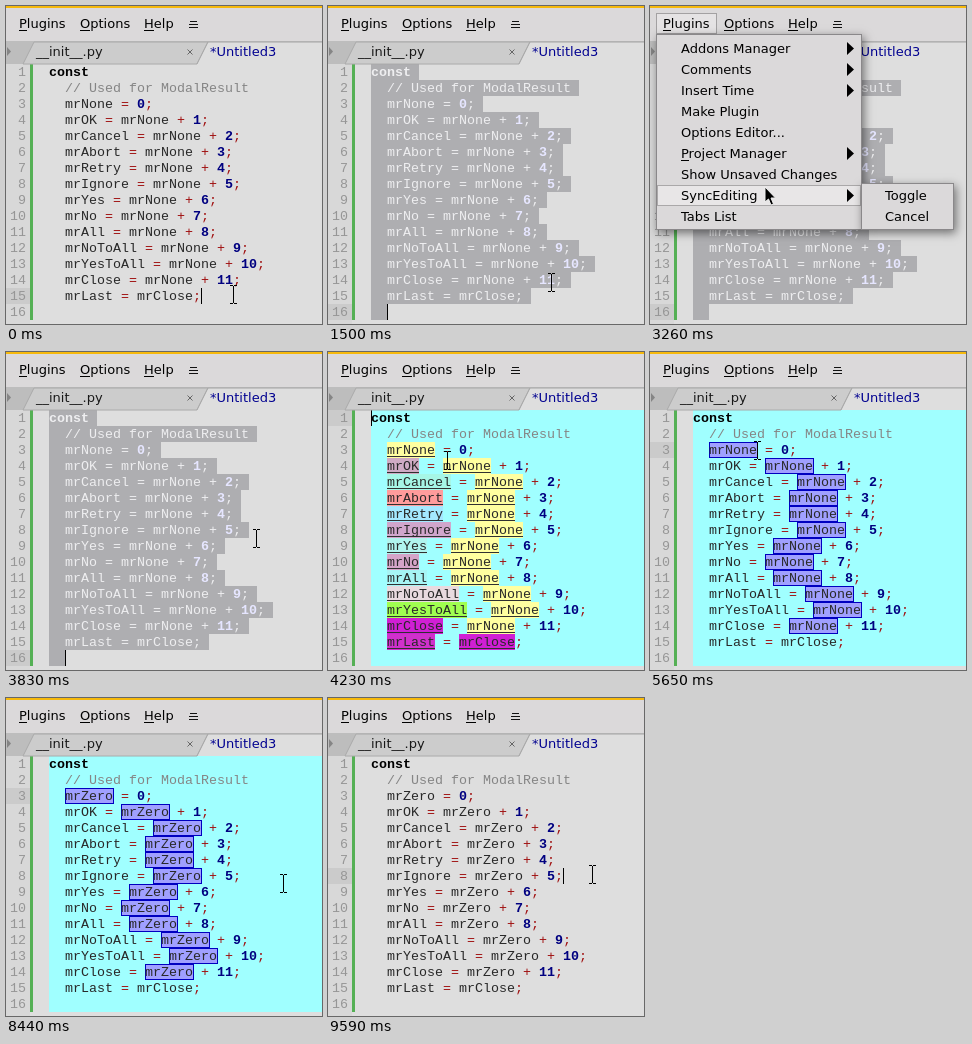
An HTML page with a canvas that plays this animation: 316 px wide and 318 px high, repeating every 9610 ms.

```html
<!DOCTYPE html>
<html>
<head>
<meta charset="utf-8">
<title>Synchronised editing</title>
<style>
html, body { margin: 0; width: 100%; height: 100%; overflow: hidden; background: #dedede; }
canvas { display: block; }
</style>
</head>
<body>
<canvas id="stage" width="316" height="318"></canvas>
<script>
const g = document.getElementById('stage').getContext('2d');
const LOOP = 9610, LEFT = 43, TOP = 58, CW = 8, LH = 16;
const UI = '13px "DejaVu Sans", sans-serif';
const MONO = '13.333px "Liberation Mono", monospace';
const PAPER = '#dedede', PANEL = '#dbd9da', CYAN = '#a0ffff';

const names = ['None', 'OK', 'Cancel', 'Abort', 'Retry', 'Ignore', 'Yes', 'No',
  'All', 'NoToAll', 'YesToAll', 'Close', 'Last'];
const tints = ['#ffffa0', '#cfabc4', '#a6f6e6', '#ff9c9c', '#a4e8ff', '#d0a6cc', '#b0f4ee',
  '#d4a4c8', '#a6f4f4', '#e8dadf', '#a0ff50', '#d01fd4', '#d030cc'];

const menu = ['Addons Manager', 'Comments', 'Insert Time', 'Make Plugin', 'Options Editor...',
  'Project Manager', 'Show Unsaved Changes', 'SyncEditing', 'Tabs List'];
const nested = [0, 1, 2, 5, 7];

// Pointer path: time, x, y
const path = [
  [0, 227, 288], [1460, 227, 288], [1740, 150, 75], [1910, 150, 75], [2140, 42, 12],
  [2340, 42, 12], [2920, 113, 181], [3240, 113, 181], [3580, 250, 186], [3850, 250, 186],
  [4230, 119, 108], [4500, 106, 94], [4900, 106, 94], [5060, 107, 98], [7950, 107, 98],
  [8270, 277, 184], [8400, 277, 184], [8440, 277, 185], [9510, 276, 185], [9590, 264, 176],
  [LOOP, 264, 176]
];

// Edited word: time, text
const edits = [[0, 'mrNone'], [5690, 'mrNon'], [5840, 'mrNo'], [5990, 'mrN'], [6120, 'mr'],
  [6740, 'mrZ'], [7050, 'mrZe'], [7230, 'mrZer'], [7650, 'mrZero']];

// Caret: time, line, column (no line = hidden)
const carets = [[0, 14, 19], [220], [820, 14, 19], [1130, 15, 2], [1700], [2270, 15, 2],
  [2880], [3480, 15, 2], [3870, 0, 0], [4480], [8680, 7, 24], [8800], [9400, 7, 24]];

const current = (list, t) => list.filter(k => k[0] <= t).pop();

function box(x, y, w, h, fill, line) {
  g.fillStyle = fill;
  g.fillRect(x, y, w, h);
  if (line) {
    g.strokeStyle = line;
    g.lineWidth = 1;
    g.strokeRect(x + .5, y + .5, w - 1, h - 1);
  }
}

function poly(points, fill, line) {
  g.beginPath();
  points.forEach(p => g.lineTo(p[0], p[1]));
  if (fill) { g.closePath(); g.fillStyle = fill; g.fill(); }
  if (line) { g.strokeStyle = line; g.lineWidth = 1; g.stroke(); }
}

function text(s, x, y, color, font = UI) {
  g.font = font;
  g.fillStyle = color;
  g.fillText(s, x, y);
}

function pointerAt(t) {
  const i = path.findIndex(k => k[0] > t);
  const [t0, x0, y0] = path[i - 1], [t1, x1, y1] = path[i];
  const p = (t - t0) / (t1 - t0), e = p * p * (3 - 2 * p);
  return [Math.round(x0 + (x1 - x0) * e), Math.round(y0 + (y1 - y0) * e)];
}

function codeLines(word) {
  const rows = names.map((n, i) => `  mr${n} = ` +
    (i === 12 ? 'mrClose;' : i ? `${word} + ${i};` : '0;'));
  rows[0] = `  ${word} = 0;`;
  return ['const', '  // Used for ModalResult', ...rows, '  '];
}

function tokenColor(s, selected) {
  if (selected) return /^\d/.test(s) ? '#e6e6ff' : '#eeeef0';
  if (s.startsWith('//')) return '#858585';
  if (/^\d/.test(s)) return '#000080';
  return /^[=+;]/.test(s) ? '#a01010' : s === 'const' ? '#000' : '#282828';
}

function drawCode(t) {
  const selected = t >= 1130 && t < 3870;
  const sync = t >= 3870 && t < 8680;
  const editing = sync && t >= 5160;
  const word = current(edits, t)[1];
  const active = t < 1130 ? 14 : t < 3870 ? 15 : t < 5160 ? 0 : t < 8680 ? 2 : 7;

  box(0, TOP, 316, 260, PAPER);
  box(0, TOP, 24, 260, '#d8d8d8');
  box(0, TOP + active * LH, 24, LH, '#cbcbcb');
  box(24, TOP, 3, 256, '#55b055');
  if (sync) box(LEFT, TOP, 316 - LEFT, 256, CYAN);

  codeLines(word).forEach((line, row) => {
    const y = TOP + row * LH, num = String(row + 1);
    text(num, 20 - num.length * CW, y + 12, '#969696', MONO);
    if (selected) box(LEFT, y, (line.length + (row < 15)) * CW, LH, '#aeaeb1');
    for (const m of line.matchAll(/\/\/.*|\w+|[=+;]/g)) {
      const s = m[0], x = LEFT + m.index * CW, w = s.length * CW;
      if (sync && s.startsWith('mr')) {
        if (!editing) {
          box(x, y, w, LH, tints[names.indexOf(s.slice(2))]);
          box(x, y + 14, w, 1, '#303030');
        } else if (s === word && (row === 2 || m.index > 2)) {
          box(x, y, w + 1, LH, '#a0a0ff', '#0000c0');
        }
      }
      const bold = /^(\d|const)/.test(s) ? 'bold ' : '';
      text(s, x, y + 12, tokenColor(s, selected), bold + MONO);
    }
  });

  const [, row, col] = current(carets, t);
  if (row !== undefined) box(LEFT + col * CW, TOP + row * LH, 1, LH, '#000');
}

function drawBars(hover) {
  box(0, 0, 316, 36, PANEL);
  box(0, 0, 316, 2, '#f6b90c');
  if (hover) box(6, 7, 61, 21, '#e5e3e4', '#a3a1a2');
  [['Plugins', 13, 8], ['Options', 74, 10], ['Help', 138, 10]].forEach(([s, x, w]) => {
    text(s, x, 22, '#000');
    box(x, 24, w, 1, '#000');
  });
  [15, 18, 21].forEach((y, i) => box(i ? 183 : 184, y, i ? 9 : 7, 1, '#111'));

  box(0, 35, 316, 23, '#bdbdbd');
  poly([[17, 58], [28, 36], [202, 36], [191, 58]], '#cccccc', '#aaaaaa');
  poly([[191, 58], [202, 36], [316, 36], [316, 58]], PAPER);
  poly([[191, 58], [202, 36], [316, 36]], null, '#a6a6a6');
  poly([[1, 41], [5, 45.5], [1, 50]], '#858585');
  text('__init__.py', 30, 50, '#181818');
  text('*Untitled3', 204, 50, '#000090');
  poly([[181.5, 43.5], [186.5, 48.5]], null, '#666');
  poly([[186.5, 43.5], [181.5, 48.5]], null, '#666');
}

function popup(x, y, w, h) {
  g.save();
  g.shadowColor = 'rgba(0,0,0,.5)';
  g.shadowBlur = 9;
  g.shadowOffsetX = 2;
  g.shadowOffsetY = 3;
  box(x, y, w, h, PANEL);
  g.restore();
  box(x, y, w, h, PANEL, '#8a888a');
}

function menuItem(s, x, y, w, lit, textX) {
  if (lit) box(x, y, w, 21, '#e8e6e7', '#aaa8a9');
  text(s, textX, y + 15, '#000');
}

function drawMenus(t, x, y) {
  popup(6, 28, 206, 196);
  const row = x > 211 ? 7 : Math.floor((y - 32) / 21);
  menu.forEach((s, i) => {
    const top = 32 + i * 21;
    menuItem(s, 7, top, 204, i === row, 31);
    if (nested.includes(i)) poly([[197, top + 4], [204, top + 10.5], [197, top + 17]], '#000');
  });
  box(31, 154, 8, 1, '#000');
  if (t < 3090) return;
  popup(211, 177, 93, 47);
  menuItem('Toggle', 212, 179, 91, x > 211, 235);
  menuItem('Cancel', 212, 200, 91, false, 235);
}

function drawPointer(x, y, arrow) {
  g.save();
  g.translate(x, y);
  if (arrow) {
    poly([[0, 0], [0, 15], [3.5, 12], [6, 18], [8.5, 17], [6, 11], [10.5, 11], [0, 0]],
      '#000', '#eee');
  } else {
    box(0, -8, 1, 17, '#000');
    [-9, 9].forEach(d => {
      box(-3, d, 3, 1, '#000');
      box(1, d, 3, 1, '#000');
    });
  }
  g.restore();
}

function frame(now) {
  const t = now % LOOP;
  const [x, y] = pointerAt(t);
  const open = t >= 2220 && t < 3830;
  drawCode(t);
  drawBars(open || (x > 6 && x < 67 && y < 28));
  if (open) drawMenus(t, x, y);
  drawPointer(x, y, open || y < TOP);
  requestAnimationFrame(frame);
}
requestAnimationFrame(frame);
</script>
</body>
</html>
```
